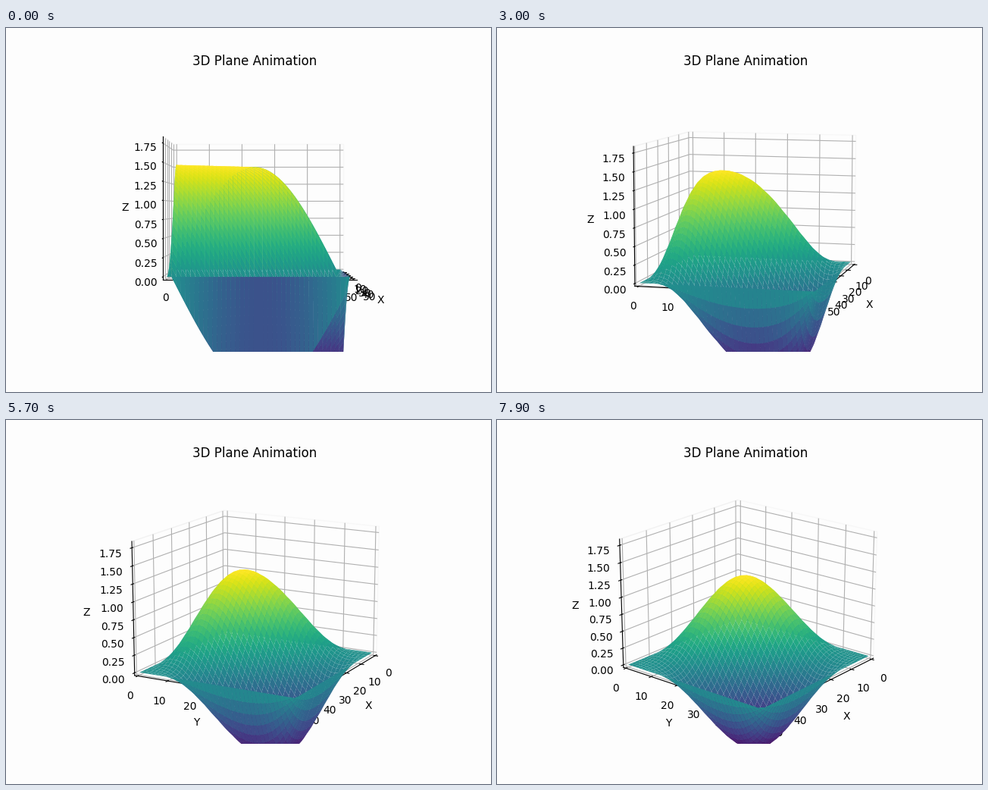
Write a matplotlib script that moves like this. It is 640 px wide and 480 px high and loops after 8000 ms.

```python
import numpy as np
import matplotlib.pyplot as plt
from matplotlib.animation import FuncAnimation

FRAMES = 80
INTERVAL = 100
SIZE = 50
CELLS = 40
Z_TOP = 1.8
MARGIN = 1 / 48


def initial_plate(x, y):
    """Diagonal wave with its rim held at zero."""
    u = 1.5 * np.sin(np.pi * (x + y) / SIZE)
    u[[0, -1], :] = 0
    u[:, [0, -1]] = 0
    return u


def diffuse(u):
    """One explicit heat step at the stability limit."""
    new = u.copy()
    new[1:-1, 1:-1] = (u[2:, 1:-1] + u[:-2, 1:-1]
                       + u[1:-1, 2:] + u[1:-1, :-2]) / 4
    return new


def padded(top):
    return -top * MARGIN, top * (1 + MARGIN)


axis_points = np.linspace(0, SIZE, CELLS + 1)
X, Y = np.meshgrid(axis_points, axis_points)
states = [initial_plate(X, Y)]
while len(states) < FRAMES:
    states.append(diffuse(states[-1]))

fig = plt.figure(figsize=(6.4, 4.8), dpi=100, facecolor="#fdfdfd")
ax = fig.add_subplot(projection="3d", facecolor="#fdfdfd")
ax.set_title("3D Plane Animation")
ax.set(xlabel="X", ylabel="Y", zlabel="Z",
       xlim=padded(SIZE), ylim=padded(SIZE), zlim=padded(Z_TOP))
for axis in (ax.xaxis, ax.yaxis, ax.zaxis):
    axis.pane.fill = False

surface = None


def update(frame):
    global surface
    if surface is not None:
        surface.remove()
    surface = ax.plot_surface(X, Y, states[frame], cmap="viridis")
    ax.view_init(elev=frame / 4, azim=frame / 2)
    return [surface]


anim = FuncAnimation(fig, update, frames=FRAMES, interval=INTERVAL,
                     init_func=lambda: update(0), repeat=True)
plt.show()
```
